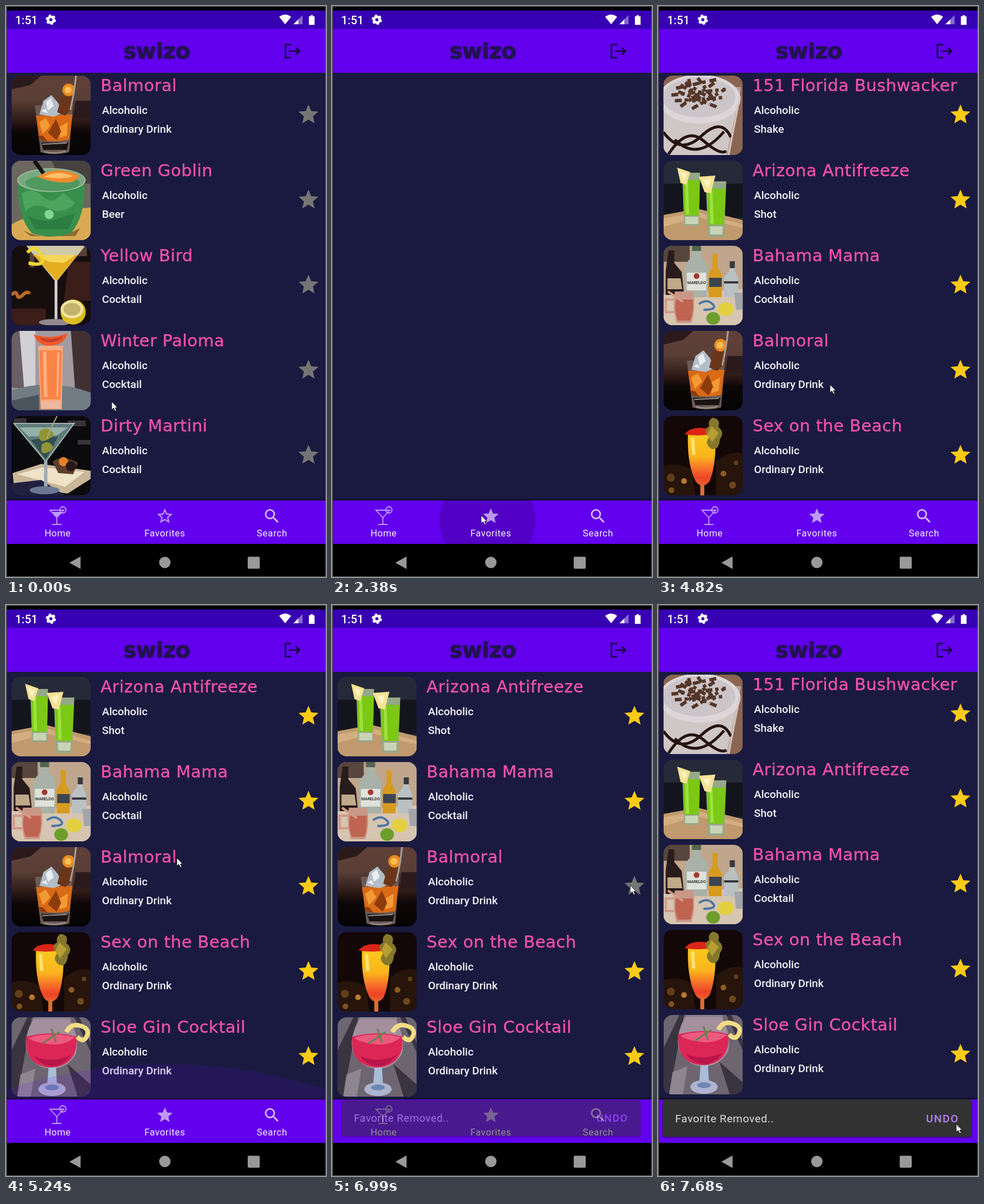
An HTML page that plays this animation: 560 by 1000 pixels, repeating every 8 s.

```html
<!DOCTYPE html>
<html lang="en">
<head>
<meta charset="utf-8">
<title>Drinks</title>
<style>
html, body { margin: 0; height: 100%; overflow: hidden; background: #000; }
svg.stage { display: block; width: 100vw; height: 100vh; }
text { font-family: Roboto, sans-serif; fill: #fff; }
.name { font: 29px "DejaVu Sans", sans-serif; letter-spacing: .5px; fill: #f953ad; stroke: #f953ad; stroke-width: .3px; }
.info { font-size: 19.08px; font-weight: 500; fill: #f2f2f5; }
.tab { font-size: 16.35px; letter-spacing: .55px; text-anchor: middle; fill: #f6f0ff; }
.logo { font: bold 38px "DejaVu Sans", sans-serif; letter-spacing: -.5px; text-anchor: middle; fill: #21134d; text-shadow: 0 0 3px #21134d; }
.line { fill: none; stroke: #fff; }
</style>
</head>
<body>
<svg class="stage" viewBox="0 0 560 1000">
<defs>
  <clipPath id="round"><rect x="9.5" width="139" height="139" rx="16"/></clipPath>
  <clipPath id="page"><rect x="1.5" y="117" width="557.5" height="749"/></clipPath>
  <clipPath id="bar"><rect x="1.5" y="866" width="557.5" height="76"/></clipPath>
  <linearGradient id="shade" x2="0" y2="1"><stop stop-opacity="0"/><stop offset="1" stop-opacity=".4"/></linearGradient>
  <linearGradient id="sunrise" x2="0" y2="1"><stop offset=".1" stop-color="#f9c51d"/><stop offset=".45" stop-color="#fbb41c"/><stop offset=".68" stop-color="#f6702a"/><stop offset=".85" stop-color="#ee4427"/><stop offset="1" stop-color="#e8622c"/></linearGradient>
  <linearGradient id="brown" x2="0" y2="1"><stop stop-color="#5f4038"/><stop offset=".3" stop-color="#5a3f36"/><stop offset=".58" stop-color="#2b1815"/><stop offset=".7" stop-color="#0d0707"/><stop offset="1" stop-color="#050304"/></linearGradient>
  <path id="star" d="M12 17.27L18.18 21l-1.64-7.03L22 9.24l-7.19-.61L12 2 9.19 8.63 2 9.24l5.46 4.73L5.82 21z"/>

  <symbol id="balmoral" viewBox="0 0 139 139">
    <path fill="url(#brown)" d="M0 0H139V139H0z"/>
    <path fill="#2b1a1c" d="M0 0H52L34 16 0 24zM112 44h27v30h-30z"/>
    <path fill="#6b5a54" d="M41 52L108 50 101 134Q75 141 51 134z"/>
    <path fill="#d96a16" d="M43 70L107 68 101 112Q75 118 49 112z"/>
    <path fill="#f39a34" d="M48 82l12-8 8 14-13 14zM84 90l15-9-2 24-13 4z"/>
    <path fill="#8e3c0c" d="M64 100l14-24 9 22-8 15zM46 104l10 2 8 10-14-4z"/>
    <path fill="#b4bcc5" d="M49 68L56 44 70 34 82 48 88 66 74 72z"/>
    <path fill="#e9eef2" d="M60 46l9-7 5 14-10 8zM52 62l8-4 4 8z"/>
    <path fill="#6a3518" d="M80 64L88 36 108 26 106 58 94 70z"/>
    <circle cx="100" cy="25" r="11" fill="#e98a20"/><circle cx="99" cy="25" r="6" fill="#f8bf55"/>
    <path d="M113 0Q110 30 103 60" fill="none" stroke="#a9a09c" stroke-width="3"/>
    <path fill="#191312" d="M52 117H100L97 130H56z"/>
    <path d="M54 120L97 118M57 133Q76 138 95 132" fill="none" stroke="#9c9291" stroke-width="2"/>
  </symbol>

  <symbol id="goblin" viewBox="0 0 139 139">
    <path fill="#6c675e" d="M0 0H139V139H0z"/>
    <path fill="#46423f" d="M70 0H139V40H90z"/>
    <path fill="#d9aa53" d="M0 112Q30 90 139 82V139H0z"/>
    <path fill="#8e6c32" d="M20 122Q70 146 120 118L112 132H34z"/>
    <path fill="#388f4b" d="M11 34Q10 100 36 127Q70 138 104 127Q130 98 128 34z"/>
    <path fill="#4ca45d" d="M18 58Q36 44 54 62T90 56L112 74Q90 96 66 84T24 88z"/>
    <path fill="#2c7d41" d="M28 96Q60 112 84 100L112 92 100 120H42z"/>
    <ellipse cx="70" cy="34" rx="59" ry="20" fill="#7aa981" stroke="#a9c4aa" stroke-width="1.5"/>
    <ellipse cx="72" cy="39" rx="48" ry="14" fill="#4f9960"/>
    <path fill="#f18a2c" d="M45 28Q80 6 119 26Q112 40 92 38 70 38 45 28z"/>
    <path fill="#ffc06a" d="M56 28Q82 15 108 27 88 34 56 28z"/>
    <circle cx="66" cy="94" r="8" fill="#84d692"/>
    <path d="M40 0L56 22" stroke="#151314" stroke-width="7"/>
  </symbol>

  <symbol id="yellow" viewBox="0 0 139 139">
    <path fill="#160e0d" d="M0 0H139V139H0z"/>
    <path fill="#3b1d1a" d="M100 28H139V96H92zM0 110H60V139H0z"/>
    <path fill="#594038" d="M32 8h8v30h-8zM112 0h20v18h-18z"/>
    <path d="M0 86q8-8 10 0t10 0 12-2" fill="none" stroke="#b86b25" stroke-width="6"/>
    <path fill="#cfc9a9" d="M26 0H129L78 64z"/>
    <path fill="#e5ae20" d="M38 16H116L79 61z"/>
    <path fill="#f5d65c" d="M42 16H112L92 30 66 28z"/>
    <path d="M28 12q14-18 24 4t-22 14" fill="none" stroke="#f0d534" stroke-width="6"/>
    <path d="M78 60V128" stroke="#cdcbd0" stroke-width="5"/>
    <ellipse cx="76" cy="134" rx="28" ry="6" fill="#91898d"/>
    <circle cx="108" cy="116" r="22" fill="#dcbd23"/>
    <ellipse cx="106" cy="111" rx="20" ry="16" fill="#eee3a0"/><ellipse cx="106" cy="111" rx="15" ry="11" fill="#c3b36a"/>
  </symbol>

  <symbol id="paloma" viewBox="0 0 139 139">
    <path fill="#a29b9f" d="M0 0H139V139H0z"/>
    <path fill="#d2d0d5" d="M14 0H42V98H22z"/>
    <path fill="#6a6063" d="M0 0H14L22 100H0z"/>
    <path fill="#403032" d="M104 0H139V112H112z"/>
    <path fill="#717b84" d="M0 104Q70 82 139 108V139H0z"/>
    <path fill="#4b535c" d="M0 122L48 112V139H0z"/>
    <path fill="#f9ac82" d="M47 26H90L88 137H51z"/>
    <path fill="#f98445" d="M49 34H88L86 120H52z"/>
    <path fill="#ffb083" d="M55 36h6l2 80h-6zM80 38h4l-2 78h-3z"/>
    <path fill="#ecb9a0" d="M52 124H86L85 135H53z"/>
    <path fill="#f0592c" d="M39 6Q69 16 98 4 94 24 68 26 45 26 39 6z"/>
    <path fill="#c8402a" d="M48 11Q70 18 91 9 84 20 68 20 53 20 48 11z"/>
  </symbol>

  <symbol id="martini" viewBox="0 0 139 139">
    <path fill="#0b0a0d" d="M0 0H139V139H0z"/>
    <path fill="#39333a" d="M4 4h22v8H4zM98 8h32v10H100zM116 42h23v8h-23z"/>
    <path fill="#c9b797" d="M2 100L52 84 139 96V110L98 136 4 120z"/>
    <path fill="#eee2c9" d="M10 102L54 90 128 98 94 124z"/>
    <path fill="#20213e" d="M0 118L52 112 94 139H0z"/>
    <path fill="#5c3e2c" d="M72 80Q90 66 116 82L108 102 82 100z"/>
    <circle cx="91" cy="80" r="8" fill="#e38224"/><circle cx="104" cy="88" r="9" fill="#29171a"/>
    <path fill="#5e7c7b" d="M4 13H110L60 80z"/>
    <path fill="#96b0a8" d="M14 20H99L80 34 30 36z"/>
    <path fill="#344f52" d="M34 42L82 36 60 76z"/>
    <path d="M4 13H110L60 80z" fill="none" stroke="#c3cfcb" stroke-width="1.5"/>
    <path fill="#8f9535" d="M50 26q10-8 20 0t-8 16-12-16zM53 50q10-8 17 0t-7 14-10-14z"/>
    <path d="M62 40Q70 18 80 0" fill="none" stroke="#aba77a" stroke-width="2"/>
    <path d="M60 78V125" stroke="#9cabb6" stroke-width="6"/>
    <ellipse cx="58" cy="130" rx="26" ry="7" fill="#6c7891"/>
  </symbol>

  <symbol id="bushwacker" viewBox="0 0 139 139">
    <path fill="#8a6552" d="M0 0H139V139H0z"/>
    <path fill="#b7a39b" d="M0 20H136L116 139H0z"/>
    <path fill="#cfc6c6" d="M0 50Q66 94 130 48L110 139H0z"/>
    <ellipse cx="63" cy="41" rx="72" ry="43" fill="#dcd6d9"/>
    <ellipse cx="62" cy="38" rx="64" ry="35" fill="#cbc4c8"/>
    <path d="M22 22l74-16M14 34l95-10M20 44l90-6M26 28l70 28M38 12l50 32M30 54l60-42M50 58l56-33M44 6l12 50M60 4l30 40M30 16l50 34" fill="none" stroke="#553629" stroke-width="6" stroke-dasharray="12 5 6 7"/>
    <path d="M0 99Q30 140 66 106T118 108M8 139Q40 88 70 114T110 132M20 112q40 40 86-14" fill="none" stroke="#25130f" stroke-width="5"/>
    <path d="M134 36L114 139" stroke="#d5c4bd" stroke-width="3"/>
  </symbol>

  <symbol id="arizona" viewBox="0 0 139 139">
    <path fill="#252a38" d="M0 0H139V139H0z"/>
    <path fill="#14151c" d="M0 40H139V100H0z"/>
    <path fill="#c09a6e" d="M0 95L60 84 139 104V139H0z"/>
    <path fill="#d3ae80" d="M0 101L60 90 139 112V118L60 99 0 116z"/>
    <path fill="#95a888" d="M33 21H64L62 114H36zM74 36H110L106 133H78z"/>
    <path fill="#7bc815" d="M34 34H64L62 96H36zM75 49H109L106 112H79z"/>
    <path fill="#9fe040" d="M38 36h5l2 58h-6zM81 52h5l2 58h-6z"/>
    <path fill="#c9d3b6" d="M38 98H61V111H38zM81 115H104L103 129H82z"/>
    <path fill="#f4e295" d="M24 12L47 20 40 42 30 39zM62 28L91 26 83 57 72 55z"/>
    <path fill="#fff4c2" d="M29 19l12 4-5 12zM69 34l14-2-5 17z"/>
  </symbol>

  <symbol id="bahama" viewBox="0 0 139 139">
    <path fill="#bfa68c" d="M0 0H139V139H0z"/>
    <path fill="#57463d" d="M0 0H46V28H0z"/>
    <path fill="#d6c5b0" d="M0 86L139 76V139H0z"/>
    <path fill="#281b1b" d="M9 8H19V30L32 46 36 86H4V44z"/>
    <path fill="#bfa98b" d="M7 57H30L33 76H7z"/>
    <path fill="#a9b2a8" d="M50 0H66V20Q78 28 77 44V90H38V44Q38 28 50 20z"/>
    <path fill="#54644f" d="M50 0H66V9H50z"/>
    <path fill="#dfe2da" d="M41 47H75V78H41z"/>
    <circle cx="58" cy="53" r="5" fill="#a53830"/>
    <text x="58" y="67" text-anchor="middle" style="font-size:7px;font-weight:700;fill:#383536">MARELDO</text>
    <path fill="#d79b20" d="M86 14H95V38L102 50V90H79V48L86 38z"/>
    <path fill="#3d4552" d="M80 56H102V72H80z"/>
    <path fill="#b9c1c3" d="M116 27H125V44L131 56V90H106V55L115 44z"/>
    <path fill="#38393f" d="M116 27H125V39H116zM106 62H131V66H106z"/>
    <path fill="#a3a5a8" d="M124 82H139V112H127z"/>
    <path fill="#c99786" d="M20 80H52Q57 108 49 135H23Q15 108 20 80z"/>
    <path fill="#c06452" d="M22 94H51Q54 112 47 131H25Q18 112 22 94z"/>
    <path d="M20 94H4V116H20M8 80L34 98" fill="none" stroke="#d29a87" stroke-width="4"/>
    <path d="M62 102q14-10 24 0t-16 10" fill="none" stroke="#4f78a5" stroke-width="4"/>
    <ellipse cx="109" cy="111" rx="14" ry="12" fill="#e2d040"/><ellipse cx="87" cy="127" rx="12" ry="11" fill="#6c9e2b"/>
  </symbol>

  <symbol id="beach" viewBox="0 0 139 139">
    <path fill="#130807" d="M0 0H139V139H0z"/>
    <path fill="#27140b" d="M0 88Q30 80 50 96L56 139H0zM92 80Q116 60 139 66V139H92z"/>
    <g fill="#b87a30"><circle cx="13" cy="108" r="7" opacity=".4"/><circle cx="36" cy="114" r="5"/><circle cx="14" cy="130" r="5" opacity=".6"/><circle cx="105" cy="101" r="5" opacity=".7"/><circle cx="121" cy="121" r="6" opacity=".5"/><circle cx="127" cy="82" r="4" opacity=".4"/></g>
    <path fill="url(#sunrise)" d="M43 30H91Q93 84 81 114Q68 130 56 114Q41 84 43 30z"/>
    <path fill="#ffe26f" d="M48 38h6l2 30h-6z"/>
    <path fill="#db2517" d="M37 32Q50 16 80 23L82 32Q60 36 37 32z"/>
    <path fill="#85782c" d="M86 3q15 2 10 16 12 10 3 21-2 22-16 17-12-9-3-20-13-12 0-19-3-10 6-15z"/>
    <path fill="#b79f35" d="M84 18l13 12-12 16-8-14z"/>
    <path d="M68 120V139" stroke="#dc6c32" stroke-width="7"/>
  </symbol>

  <symbol id="sloe" viewBox="0 0 139 139">
    <path fill="#6d6570" d="M0 0H139V139H0z"/>
    <path fill="#393440" d="M0 58L28 0H36L10 139H0zM98 82L139 118V139H116zM110 0H119L139 46V62z"/>
    <path fill="#8d8590" d="M40 0H104V20H30zM16 100L42 90 34 139H10z"/>
    <path fill="#a48f9d" d="M38 4Q18 40 29 64 44 90 70 90 98 90 113 64 120 36 102 4z"/>
    <path fill="#dc2655" d="M26 34Q22 86 70 88 117 84 114 34 72 22 26 34z"/>
    <path fill="#ec5a80" d="M30 36Q70 24 111 35 92 51 64 47T30 36z"/>
    <path fill="#b8164a" d="M40 68Q70 82 104 66 90 86 70 86 50 84 40 68z"/>
    <path d="M54 46L84 26M70 20l8 24" stroke="#65804e" stroke-width="3"/>
    <path d="M96 26Q104 10 121 15T132 33Q126 46 115 34" fill="none" stroke="#f0dc83" stroke-width="8"/>
    <path fill="#a9bcd8" d="M65 88H78L80 124H62z"/>
    <ellipse cx="71" cy="126" rx="24" ry="12" fill="#aeb4d0"/><ellipse cx="71" cy="123" rx="12" ry="5" fill="#6d87b4"/>
  </symbol>
</defs>

<rect width="560" height="1000" fill="#6a6a6a"/>
<path d="M1.5 1H559V999H1.5z"/>
<path fill="#1a1a40" d="M1.5 117H559V866H1.5z"/>
<g clip-path="url(#page)">
  <g id="home"></g><g id="favs"></g><g id="rest"></g>
  <path id="glow" fill="#6200ee" d="M1 0V-18Q280-106 559-18V0z"/>
  <path fill="url(#shade)" d="M1 861H559V866H1z"/>
</g>

<path fill="#3700b3" d="M1.5 8H559V41H1.5z"/>
<path fill="#6200ee" d="M1.5 40H559V117H1.5zM1.5 866H559V942H1.5z"/>
<text x="16" y="32" font-size="20" font-weight="500">1:51</text>
<g class="line"><circle cx="78.5" cy="24" r="5" stroke-width="4.5"/><circle cx="78.5" cy="24" r="7.5" stroke-width="3" stroke-dasharray="4.2 3.654"/></g>
<path fill="#fff" d="M478 19Q488.5 11 499 19L488.5 32zM503 32L511.5 23.5V32zM530 18H533V16H537V18H540V33H530z"/>
<path fill="#fff" opacity=".4" d="M503 32L519 16V32z"/>
<text class="logo" x="264" y="92">swizo</text>
<path d="M499 67.5H489V90.5H499M495 79H513M507.5 73L513.5 79 507.5 85" fill="none" stroke="#160a3c" stroke-width="2.7"/>

<g clip-path="url(#bar)"><circle id="ripple" cx="272" cy="900" r="84" fill="#000" fill-opacity=".17"/></g>
<g class="line" stroke-width="1.8" opacity=".6">
  <path d="M77 883H101L89 896zM89 896V908M81 908H97"/>
  <circle cx="99.5" cy="882.5" r="5.5"/>
  <path id="liquid" fill="#fff" stroke="none" d="M80 886H98L89 895z"/>
</g>
<g transform="translate(261.65 877) scale(1.3625)">
  <use id="tabStar" href="#star" fill="#fff" opacity=".6"/>
  <path id="tabOutline" fill="#fff" opacity=".6" d="M22 9.24l-7.19-.62L12 2 9.19 8.63 2 9.24l5.46 4.73L5.82 21 12 17.27 18.18 21l-1.63-7.03zM12 15.4l-3.76 2.27 1-4.28-3.32-2.88 4.38-.38L12 6.1l1.71 4.04 4.38.38-3.32 2.88 1 4.28z"/>
</g>
<path transform="translate(449 877) scale(1.3625)" fill="#fff" opacity=".75" d="M15.5 14h-.79l-.28-.27A6.47 6.47 0 0 0 16 9.5 6.5 6.5 0 1 0 9.5 16c1.61 0 3.09-.59 4.23-1.57l.27.28v.79l5 4.99L20.49 19zm-6 0C7.01 14 5 11.99 5 9.5S7.01 5 9.5 5 14 7.01 14 9.5 11.99 14 9.5 14z"/>
<text class="tab" x="90.5" y="928.5">Home</text>
<text class="tab" x="278" y="928.5">Favorites</text>
<text class="tab" x="465.5" y="928.5">Search</text>

<path fill="#999" d="M111 975L130.5 964V986z"/>
<circle cx="278" cy="974.5" r="10" fill="#999"/>
<rect x="423" y="964.5" width="21" height="21" rx="2" fill="#999"/>

<g id="snack">
  <rect x="7" y="868" width="543" height="66" rx="5" opacity=".25"/>
  <rect x="8" y="866" width="541" height="65.5" rx="5" fill="#323232"/>
  <text x="30" y="905.5" style="font-size:19.08px;letter-spacing:.6px;fill:#dedede">Favorite Removed..</text>
  <text x="469" y="905.5" style="font-size:19.08px;font-weight:500;letter-spacing:1.5px;fill:#b580f5">UNDO</text>
</g>
<path id="cursor" d="M0 0V14L3.5 11 6 16.5 8.3 15.5 6 10.5H10z" fill="#fff" stroke="#111" stroke-width=".8"/>
</svg>

<script>
const LOOP = 8000, GREY = '#757575', GOLD = '#fdcb16';
const $ = id => document.getElementById(id);

const drinks = {
  balmoral: ['Balmoral', 'Ordinary Drink'],
  goblin: ['Green Goblin', 'Beer'],
  yellow: ['Yellow Bird', 'Cocktail'],
  paloma: ['Winter Paloma', 'Cocktail'],
  martini: ['Dirty Martini', 'Cocktail'],
  bushwacker: ['151 Florida Bushwacker', 'Shake'],
  arizona: ['Arizona Antifreeze', 'Shot'],
  bahama: ['Bahama Mama', 'Cocktail'],
  beach: ['Sex on the Beach', 'Ordinary Drink'],
  sloe: ['Sloe Gin Cocktail', 'Ordinary Drink']
};

function fillList(list, ids, color) {
  $(list).innerHTML = ids.split(' ').map((id, i) => `
    <g transform="translate(0 ${122 + 149 * i})">
      <g clip-path="url(#round)"><use href="#${id}" x="9.5" width="139" height="139"/></g>
      <text class="name" x="165.5" y="27">${drinks[id][0]}</text>
      <text class="info" x="168" y="66.5">Alcoholic</text>
      <text class="info" x="168" y="100">${drinks[id][1]}</text>
      <use href="#star" class="${id}" fill="${color}" transform="translate(508.4 47) scale(1.74)"/>
    </g>`).join('');
}
fillList('home', 'balmoral goblin yellow paloma martini', GREY);
fillList('favs', 'bushwacker arizona bahama balmoral beach sloe', GOLD);
fillList('rest', 'bushwacker arizona bahama beach sloe', GOLD);
const homeStar = document.querySelector('#home .balmoral');
const favStar = document.querySelector('#favs .balmoral');

// The screen refreshes in bursts: [first, last, count]
const bursts = [[140, 690, 5], [1090, 2130, 8], [2380, 2630, 3], [3040, 4040, 8],
  [4160, 5090, 8], [5240, 6140, 8], [6290, 6580, 3], [6990, 7680, 6]];
const ticks = [0, ...bursts.flatMap(([a, b, n]) =>
  Array.from({ length: n }, (_, i) => Math.floor((a + (b - a) * i / (n - 1)) / 10) * 10))];

// Keys are [time, ...values], joined by straight lines
const path = [[0, 185, 693], [550, 505, 161], [690, 513, 178], [1090, 513, 178],
  [1840, 275, 880], [1980, 262, 914], [2130, 261, 892], [2900, 261, 892],
  [3180, 253, 861], [4040, 298, 700], [4690, 301, 663], [4820, 301, 663],
  [5090, 299, 475], [5240, 299, 443], [5500, 299, 449], [6140, 467, 487],
  [6580, 522, 491], [7120, 522, 491], [7680, 522, 909]];
const scroll = [[4820, 0], [5090, 145]];
const glow = [[4950, 0], [5240, 1], [5800, 0]];
const ripple = [[2380, 1], [2630, 0]];

function at(keys, t) {
  const i = keys.findIndex(k => k[0] > t);
  if (i < 0) return keys[keys.length - 1].slice(1);
  if (!i) return keys[0].slice(1);
  const a = keys[i - 1], b = keys[i], u = (t - a[0]) / (b[0] - a[0]);
  return a.slice(1).map((v, j) => v + (b[j + 1] - v) * u);
}

const show = (id, on) => $(id).style.display = on ? '' : 'none';
const put = (id, name, value) => $(id).setAttribute(name, value);

function slide(id, t, start, y) {
  const u = Math.min(1, Math.max(0, (t - start) / 300));
  const p = 1 - (1 - u) ** 2;
  put(id, 'transform', `translate(${-280 * (1 - p)} ${-y})`);
  put(id, 'opacity', p);
}

function draw(now) {
  const time = now % LOOP;
  const t = ticks.filter(k => k <= time).pop();
  const onFavs = t >= 2380, removed = t >= 6990, reloaded = t >= 7120;

  show('home', !onFavs);
  show('favs', t >= 3040 && !reloaded);
  show('rest', reloaded);
  slide('favs', t, 2950, at(scroll, t)[0]);
  slide('rest', t, 7090, 0);
  homeStar.setAttribute('fill', t >= 1090 ? GOLD : GREY);
  favStar.setAttribute('fill', removed ? GREY : GOLD);

  const [g] = at(glow, t);
  put('glow', 'transform', `translate(0 866) scale(1 ${g})`);
  put('glow', 'opacity', g * .13);

  show('ripple', onFavs);
  put('ripple', 'opacity', at(ripple, t)[0]);
  show('liquid', !onFavs);
  show('tabStar', onFavs);
  show('tabOutline', !onFavs);

  show('snack', removed);
  put('snack', 'opacity', reloaded ? 1 : .5);
  put('snack', 'transform', `translate(278.5 898.5) scale(${reloaded ? 1 : .967}) translate(-278.5 -898.5)`);
  put('cursor', 'transform', `translate(${at(path, t)})`);
  requestAnimationFrame(draw);
}
const begin = performance.now();
requestAnimationFrame(function frame(now) { draw(Math.max(0, now - begin)); });
</script>
</body>
</html>
```
